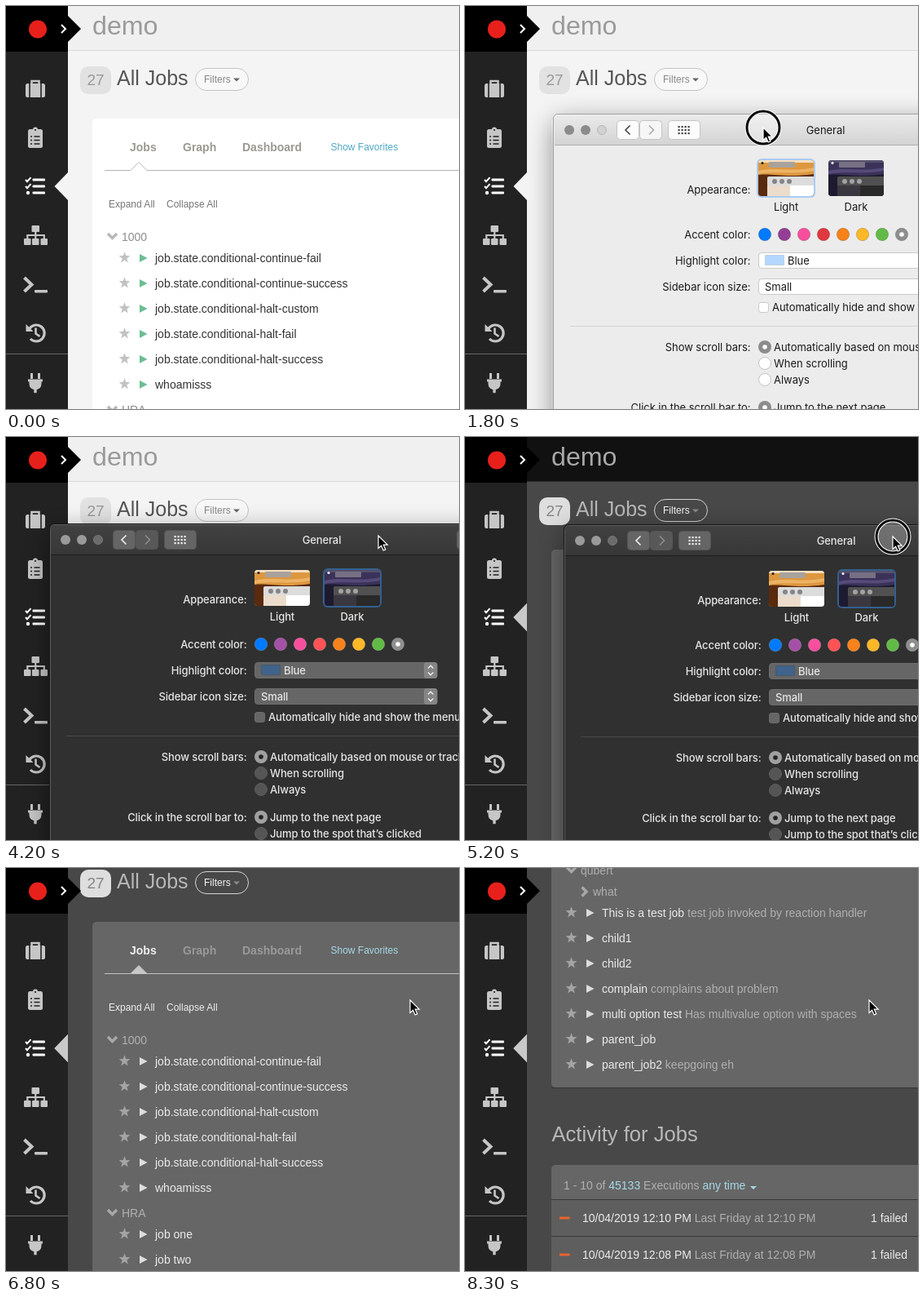
Animation, 556 px wide and 494 px high, one loop 8.4 s. Source, as an HTML page:

```html
<!DOCTYPE html>
<html lang="en">
<head>
<meta charset="utf-8">
<title>Dark mode demo</title>
<style>
html, body { margin: 0; width: 100%; height: 100%; overflow: hidden; background: #f4f4f4; }
svg { display: block; width: 556px; height: 494px; overflow: hidden; }
.page { font-family: "Liberation Sans", Arial, sans-serif; }
.win { font: 13px Inter, sans-serif; letter-spacing: -.04px; }
#darkWin { font-weight: 500; letter-spacing: -.12px; }
</style>
</head>
<body>
<svg id="stage" viewBox="0 0 556 494"></svg>
<script>
const LOOP = 8400, STEP = 100;

const pageThemes = {
  light: {
    body: '#f4f4f4', head: '#f0f0f0', headLine: '#d9d9d9', title: '#9a9a9a',
    badge: '#e2e2e2', badgeText: '#999', h1: '#555', pill: '#f8f8f8', pillLine: '#c4c4c4',
    pillText: '#888', caret: '#666', card: '#fff', tab: '#9a9a92', tabOn: '#9a9a92',
    link: '#4fa9c4', line: '#b4b4b4', tick: '#fff', small: '#777', group: '#8c8c8c',
    chevron: '#b8b8b8', star: '#c2c2c2', fav: '#4fa9c4', play: '#6cbd93', job: '#333',
    desc: '#999', notch: '#f4f4f4', rows: '#fafafa', rowLine: '#ddd'
  },
  dark: {
    body: '#484848', head: '#111', headLine: '#2c2c2c', title: '#a8a8a8',
    badge: '#dedede', badgeText: '#858585', h1: '#b8b8b8', pill: '#484848', pillLine: '#d5d5d5',
    pillText: '#f4f4f4', caret: '#888', card: '#666', tab: '#999', tabOn: '#efefef',
    link: '#a6d9e8', line: '#c2c2c2', tick: '#c8c8c8', small: '#eee', group: '#b0b0b0',
    chevron: '#a8a8a8', star: '#a4a4a4', fav: '#a9dcee', play: '#ddd', job: '#ebebeb',
    desc: '#b0b0b0', notch: '#c9c9c9', rows: '#5e5e5e', rowLine: '#383838'
  }
};

const winThemes = {
  light: {
    top: '#eaeaea', end: '#d3d3d3', edge: '#b0b0b0', rim: '#ededed', outline: '#a2a2a2',
    body: '#ececec', text: '#1a1a1a',
    dot: '#8b8b8b', dotOff: '#d2d2d2', dotRim: '#b5b5b5', btn: '#fcfcfc', btnOff: '#f6f6f6',
    btnLine: '#c4c4c4', glyph: '#444', glyphOff: '#aaa', field: '#fff', fieldLine: '#cacaca',
    stepper: '#8c8c8c', arrow: '#fff', swatch: '#b3d7ff', rule: '#d4d4d4', radio: '#8c8c8c',
    radioDot: '#fff', radioOff: '#fff', radioLine: '#c2c2c2', select: '#a9cbf3', ring: 'rgba(0,0,0,.18)',
    accents: ['#007aff', '#953d96', '#f74f9e', '#e0383e', '#f7821b', '#fcb827', '#62ba46', '#8e8e8e']
  },
  dark: {
    top: '#414141', end: '#373737', edge: '#1c1c1c', rim: '#5c5c5c', outline: '#161616',
    body: '#303030', text: '#e6e6e6',
    dot: '#9a9a9a', dotOff: '#6c6c6c', dotRim: '#777', btn: '#656565', btnOff: '#585858',
    btnLine: '#555', glyph: '#eee', glyphOff: '#8c8c8c', field: '#666', fieldLine: '#6c6c6c',
    stepper: '#858585', arrow: '#f0f0f0', swatch: '#3f638b', rule: '#484848', radio: '#a0a0a0',
    radioDot: '#222', radioOff: '#555', radioLine: '#5e5e5e', select: '#33608f', ring: 'rgba(255,255,255,.18)',
    accents: ['#007aff', '#a550a7', '#f74f9e', '#ff5257', '#f7821b', '#fcb827', '#62ba46', '#8e8e8e']
  }
};

// g: group, s: nested group, j: job, f: favorite job, r: top-level job
const step = 'a step to test a file exists given option value';
const jobs = [
  ['g', '1000'],
  ...['continue-fail', 'continue-success', 'halt-custom', 'halt-fail', 'halt-success']
    .map(s => ['j', 'job.state.conditional-' + s]),
  ['j', 'whoamisss'],
  ['g', 'HRA'], ['j', 'job one'], ['j', 'job two'],
  ['g', 'basic'], ['j', 'whoami', 'basic job'],
  ['g', 'demo'], ['f', 'job test', step], ['j', 'job test retry', step],
  ['g', 'demo2'], ['j', 'groovy script test', 'many opts'], ['j', 'job long opts test', 'many opts'],
  ['j', 'job test step first', step], ['j', 'job test step first with reference', step],
  ['g', 'job-plugin-test'], ['j', 'test job 2', 'some steps'], ['j', 'test job1', 'some steps'],
  ['j', 'test job2', 'some steps and plugins'],
  ['g', 'monkey'], ['s', 'disaster'], ['g', 'qubert'], ['s', 'what'],
  ['r', 'This is a test job', 'test job invoked by reaction handler'],
  ['r', 'child1'], ['r', 'child2'], ['r', 'complain', 'complains about problem'],
  ['r', 'multi option test', 'Has multivalue option with spaces'],
  ['r', 'parent_job'], ['r', 'parent_job2', 'keepgoing eh']
];

const rect = (x, y, w, h, fill, r = 0, line = 'none') =>
  `<rect x="${x}" y="${y}" width="${w}" height="${h}" rx="${r}" fill="${fill}" stroke="${line}"/>`;
const shape = (d, fill) => `<path d="${d}" fill="${fill}"/>`;
const stroke = (d, color, w = 1) => `<path d="${d}" fill="none" stroke="${color}" stroke-width="${w}"/>`;
const disc = (x, y, r, fill, line = 'none') =>
  `<circle cx="${x}" cy="${y}" r="${r}" fill="${fill}" stroke="${line}"/>`;
const text = (x, y, s, fill, size = 14, extra = '') =>
  `<text x="${x}" y="${y}" fill="${fill}" font-size="${size}" ${extra}>${s}</text>`;
const span = (s, fill) => `<tspan fill="${fill}">${s}</tspan>`;

function star(cx, cy, fill) {
  let d = '';
  for (let i = 0; i < 10; i++) {
    const r = i % 2 ? 3 : 7.3, a = i * Math.PI / 5;
    d += (i ? 'L' : 'M') + (cx + r * Math.sin(a)).toFixed(2) + ' ' + (cy - r * Math.cos(a)).toFixed(2);
  }
  return shape(d + 'z', fill);
}

function jobList(c) {
  let y = 283, out = '';
  for (const [kind, name, desc] of jobs) {
    if (kind === 'g') {
      out += stroke(`M125 ${y - 4}l5.5 5.5 5.5 -5.5`, c.chevron, 3.4) + text(142, y + 5, name, c.group);
    } else if (kind === 's') {
      out += stroke(`M143.5 ${y - 5.5}l5.5 5.5 -5.5 5.5`, c.chevron, 3.4) + text(157, y + 5, name, c.group);
    } else {
      const x = kind === 'r' ? -15 : 0;
      out += star(145.5 + x, y - .5, kind === 'f' ? c.fav : c.star) +
        shape(`M${164 + x} ${y - 5}l9.5 5 -9.5 5z`, c.play) +
        text(183 + x, y + 5, name + (desc ? ' ' + span(desc, c.desc) : ''), c.job);
    }
    y += 'gs'.includes(kind) ? 26 : 31;
  }
  return out;
}

function activity(c) {
  const y = 1410;
  let out = text(106.5, 1381, 'Activity for Jobs', c.h1, 25.6) +
    rect(106, y, 480, 600, c.card, 5) + rect(106, y + 42, 480, 500, c.rows) +
    text(121, y + 30, `1 - 10 of ${span('45133', c.link)} Executions ${span('any time', c.link)}`, c.desc) +
    shape(`M350 ${y + 26}h8l-4 4z`, c.link);
  ['12:10', '12:08', '12:05'].forEach((time, i) => {
    const ry = y + 65 + i * 45;
    out += rect(106, ry - 23, 480, 1, c.rowLine) + rect(116, ry - 1.5, 12.5, 3, '#e8642f') +
      text(144, ry + 5, `10/04/2019 ${time} PM ${span(`Last Friday at ${time} PM`, c.desc)}`, c.job) +
      text(498, ry + 5, '1 failed', c.job);
  });
  return out;
}

function page(c) {
  const bold = 'font-weight="bold"';
  return rect(0, 0, 556, 2000, c.body) + rect(0, 0, 556, 54, c.head) + rect(0, 54, 556, 1, c.headLine) +
    text(106, 35, 'demo', c.title, 32.2) +
    rect(91, 74, 38, 34, c.badge, 10) + text(99.5, 97, '27', c.badgeText, 19) +
    text(136, 97, 'All Jobs', c.h1, 25) +
    rect(232.5, 76.5, 65, 27, c.pill, 13.5, c.pillLine) + text(243, 94, 'Filters', c.pillText, 12) +
    shape('M279 88.5h8l-4 4z', c.caret) +
    rect(106, 1315, 480, 1, 'rgba(0,0,0,.25)') + rect(106, 138, 480, 1177, c.card, 5) +
    text(152, 178, 'Jobs', c.tabOn, 14, bold) + text(217, 178, 'Graph', c.tab, 14, bold) +
    text(290, 178, 'Dashboard', c.tab, 14, bold) + text(398.5, 177, 'Show Favorites', c.link, 12) +
    shape('M152.5 202l10.5 -10.5 10.5 10.5z', c.tick) +
    stroke('M121 201.5h32l10 -10 10 10h383', c.line) +
    text(126, 247, 'Expand All', c.small, 12) + text(197, 247, 'Collapse All', c.small, 12) +
    jobList(c) + activity(c);
}

function sidebar() {
  const g = '#c6c6c6', bg = '#222', w = '#fff';
  const box = x => rect(x, 285, 8.5, 8, g, 1);
  const row = y => rect(32.5, y - 1.5, 15.5, 3, w, 1);
  return rect(0, 0, 76, 494, bg) + rect(0, 0, 76, 56, '#000') +
    shape('M75 11l17 17 -17 17z', '#000') + stroke('M68 23l5 5 -5 5', w, 2) +
    disc(39, 28.5, 11, '#e8201c') + rect(0, 426, 76, 1, '#666') +
    // suitcase
    rect(24, 95, 24, 17, g, 2.5) + stroke('M31.5 96v-4h9v4', g, 2.6) + stroke('M29 95v17M43 95v17', bg, 1.6) +
    // clipboard
    rect(27, 151, 18, 23, g, 2.5) + disc(36, 151.5, 3, g) + disc(36, 152, 1.1, bg) +
    stroke('M34.5 160h7M34.5 164.5h7M34.5 169h7M30 160h2M30 164.5h2M30 169h2', bg, 1.6) +
    // checklist
    row(213) + row(221) + row(229) + disc(27, 229, 2.2, w) +
    stroke('M24 213l2 2.2 4.5 -5M24 221l2 2.2 4.5 -5', w, 2) +
    // tree
    rect(31.5, 269, 9.5, 8, g, 1) + box(22) + box(32) + box(42.5) +
    stroke('M36.3 276v10M26.3 286v-5h20.5v5', g, 2.2) +
    // prompt
    stroke('M22.5 333l9 8.5 -9 8.5', g, 4) + rect(35, 348, 16, 3.5, g, 1) +
    // history
    stroke('M28.5 396a10 10 0 1 1 1.5 12', g, 3.2) + shape('M24.5 390v9h9z', g) +
    stroke('M36.5 394.5v7l5 3.5', g, 2.6) +
    // plug
    stroke('M31.5 450v7M40.5 450v7', g, 3) +
    shape('M27 457.5h18v3h-1.5v2.5a7.5 7.5 0 0 1 -5.8 7.2v4h-3.4v-4a7.5 7.5 0 0 1 -5.8 -7.2v-2.5h-1.5z', g);
}

const notch = (c, id) => `<path id="${id}" d="M76 204v34l-16.5 -17z" fill="${c.notch}"/>`;

function thumb(x, dark, select) {
  const p = dark
    ? { sky: '#3a3259', dune: '#1d1a30', glow: '#554a78', bar: '#55506a', win: '#777084', pane: '#505050', left: '#3a3740', right: '#292929', dot: '#a2a2a2', mark: '#eee' }
    : { sky: '#dd973f', dune: '#5a2a0e', glow: '#edb364', bar: '#f5dfc2', win: '#a9a29c', pane: '#dcdcdc', left: '#ecdccb', right: '#fff', dot: '#858585', mark: '#222' };
  return `<g transform="translate(${x} 56)">` +
    (select ? rect(-2, -2, 72, 48, select, 6) : '') +
    '<g clip-path="url(#thumb)">' + rect(0, 0, 68, 44, p.sky) +
    shape('M0 18C18 16 34 22 68 17V44H0z', p.dune) +
    shape('M0 13C22 8 42 15 68 9V13C44 18 24 13 0 17z', p.glow) +
    rect(0, 0, 68, 3, p.bar) + rect(13, 2, 32, 7, p.win, 1) + disc(5, 3.5, 1.6, p.mark) +
    rect(11, 20, 60, 12, p.pane, 2) + rect(11, 31, 28, 13, p.left) + rect(39, 31, 29, 13, p.right) +
    [20, 29, 38].map(d => disc(d, 26, 3, p.dot)).join('') + '</g></g>';
}

function prefs(c, id) {
  const label = (y, s) => text(241.5, y + 4.5, s, c.text, 13, 'text-anchor="end"');
  const mid = (x, y, s) => text(x, y + 4.5, s, c.text, 13, 'text-anchor="middle"');
  const popup = (y, s, x) => rect(251.5, y - 9.5, 223, 19, c.field, 3.5, c.fieldLine) +
    rect(459, y - 10, 16.5, 20, c.stepper, 3.5) +
    stroke(`M464 ${y - 2.5}l3.2 -3.2 3.2 3.2M464 ${y + 2.5}l3.2 3.2 3.2 -3.2`, c.arrow, 1.4) +
    text(x, y + 4.5, s, c.text, 13);
  const radio = (y, s, on) => (on
    ? disc(259, y, 8, c.radio) + disc(259, y, 2.8, c.radioDot)
    : disc(259, y, 7.5, c.radioOff, c.radioLine)) + text(270, y + 4.5, s, c.text, 13);
  let dots = '';
  for (let r = 0; r < 3; r++)
    for (let k = 0; k < 4; k++) dots += rect(152.5 + k * 4, 14 + r * 4, 2.2, 2.2, c.glyph);

  return `<linearGradient id="${id}" x2="0" y2="1"><stop stop-color="${c.top}"/><stop offset="1" stop-color="${c.end}"/></linearGradient>` +
    rect(-.5, -.5, 669, 562, c.body, 5.5, c.outline) + rect(.5, .5, 667, 560, c.body, 5, c.rim) +
    shape('M1 38V6a5 5 0 0 1 5 -5H662a5 5 0 0 1 5 5V38z', `url(#${id})`) + rect(1, 37, 666, 1, c.edge) +
    disc(19, 19, 6, c.dot) + disc(39, 19, 6, c.dot) + disc(59, 19, 5.5, c.dotOff, c.dotRim) +
    rect(77.5, 7.5, 27, 23, c.btn, 4, c.btnLine) + rect(105.5, 7.5, 27, 23, c.btnOff, 4, c.btnLine) +
    stroke('M93.5 13.5l-5.5 5.5 5.5 5.5', c.glyph, 1.6) + stroke('M117 13.5l5.5 5.5 -5.5 5.5', c.glyphOff, 1.6) +
    rect(140.5, 7.5, 39, 23, c.btn, 4, c.btnLine) + dots +
    mid(333.5, 19, 'General') + rect(499.5, 7.5, 156, 23, c.btn, 4, c.btnLine) +
    label(92.5, 'Appearance:') +
    thumb(251, false, id === 'light' && c.select) + thumb(337, true, id === 'dark' && c.select) +
    mid(285, 113.5, 'Light') + mid(371, 113.5, 'Dark') +
    label(147, 'Accent color:') +
    c.accents.map((a, i) => disc(259 + 24 * i, 147, 7.7, a, c.ring)).join('') + disc(427, 147, 2.8, '#fff') +
    label(179, 'Highlight color:') + popup(179, 'Blue', 287) + rect(259.5, 172.5, 23, 12, c.swatch, 0, 'rgba(0,0,0,.12)') +
    label(211, 'Sidebar icon size:') + popup(211, 'Small', 259) +
    rect(251.5, 230.5, 12, 12, c.field, 2.5, c.fieldLine) +
    text(268, 241, 'Automatically hide and show the menu bar', c.text, 13) +
    rect(20, 259, 628, 1, c.rule) +
    label(285, 'Show scroll bars:') + radio(285, 'Automatically based on mouse or trackpad', true) +
    radio(305, 'When scrolling') + radio(325, 'Always') +
    label(359, 'Click in the scroll bar to:') + radio(359, 'Jump to the next page', true) +
    radio(379, 'Jump to the spot that’s clicked');
}

document.getElementById('stage').innerHTML =
  '<defs><clipPath id="thumb"><rect width="68" height="44" rx="4"/></clipPath></defs>' +
  `<g class="page"><g id="scroll">${page(pageThemes.light)}<g id="darkPage">${page(pageThemes.dark)}</g></g>` +
  sidebar() + notch(pageThemes.light, 'lightNotch') + notch(pageThemes.dark, 'darkNotch') + '</g>' +
  '<g id="win" class="win"><rect y="9" width="668" height="560" rx="8" opacity=".45" style="filter:blur(16px)"/>' +
  `<g id="lightWin">${prefs(winThemes.light, 'light')}</g><g id="darkWin">${prefs(winThemes.dark, 'dark')}</g></g>` +
  '<g id="cursor"><g id="ring"><circle r="20" fill="rgba(255,255,255,.25)" stroke="#fff" stroke-width="5"/>' +
  '<circle r="20" fill="none" stroke="#0a0a0a" stroke-width="3"/></g>' +
  '<path d="M0 0V15.5L3.6 12.2 6.2 18 8.8 16.9 6.3 11.2H11.2Z" fill="#000" stroke="#fff" stroke-width="1.2"/></g>';

const parts = Object.fromEntries(
  ['scroll', 'darkPage', 'darkNotch', 'win', 'lightWin', 'darkWin', 'cursor', 'ring']
    .map(id => [id, document.getElementById(id)]));

// Each key: [time, ...values], linear in between.
const winKeys = [
  [1100, 600, 165], [1200, 520, 160], [1400, 350, 150], [1600, 188, 140], [1800, 109, 133],
  [2000, 72, 117], [2200, 54, 107], [4600, 54, 107], [4700, 57, 107], [5000, 78, 107],
  [5300, 144, 108], [5600, 252, 109], [5800, 380, 114], [6000, 536, 128], [6100, 536, 128], [6200, 720, 140]
];
const pointerKeys = [[2200, 311, 123], [2400, 335, 136], [2700, 413, 170], [2800, 421, 174]];
const scrollKeys = [
  [6600, 0], [6700, 14], [6900, 130], [7100, 340], [7300, 530], [7400, 568], [7500, 568],
  [7600, 577], [7700, 600], [7900, 740], [8100, 930], [8300, 1046]
];

function at(keys, t) {
  if (t <= keys[0][0]) return keys[0].slice(1);
  const i = keys.findIndex(k => k[0] >= t);
  if (i < 0) return keys[keys.length - 1].slice(1);
  const a = keys[i - 1], b = keys[i], f = (t - a[0]) / (b[0] - a[0]);
  return a.slice(1).map((v, j) => v + (b[j + 1] - v) * f);
}

function pointer(t, [x, y]) {
  if (t < 2200) return [x + 257, y + 16];
  if (t < 4200) return at(pointerKeys, t);
  if (t < 6700) return [x + 403, y + 14];
  return [495.5, 161.5];
}

const within = (t, a, b) => t >= a && t < b;
const move = (node, [x, y]) =>
  node.setAttribute('transform', `translate(${Math.round(x)} ${Math.round(y)})`);
const show = (node, on) => { node.style.display = on ? '' : 'none'; };

function draw() {
  const t = Math.floor(performance.now() % LOOP / STEP) * STEP;
  const pos = at(winKeys, t), dark = Math.min(1, Math.max(0, (t - 4200) / 300));
  move(parts.scroll, [0, -at(scrollKeys, t)[0]]);
  parts.darkPage.setAttribute('opacity', dark);
  parts.darkNotch.setAttribute('opacity', dark);
  move(parts.win, pos);
  show(parts.win, within(t, 1200, 6200));
  show(parts.lightWin, t < 4200);
  show(parts.darkWin, t >= 4200);
  move(parts.cursor, pointer(t, pos));
  show(parts.ring, within(t, 1200, 2200) || within(t, 3100, 3500) || within(t, 4500, 6200));
  requestAnimationFrame(draw);
}
draw();
</script>
</body>
</html>
```
